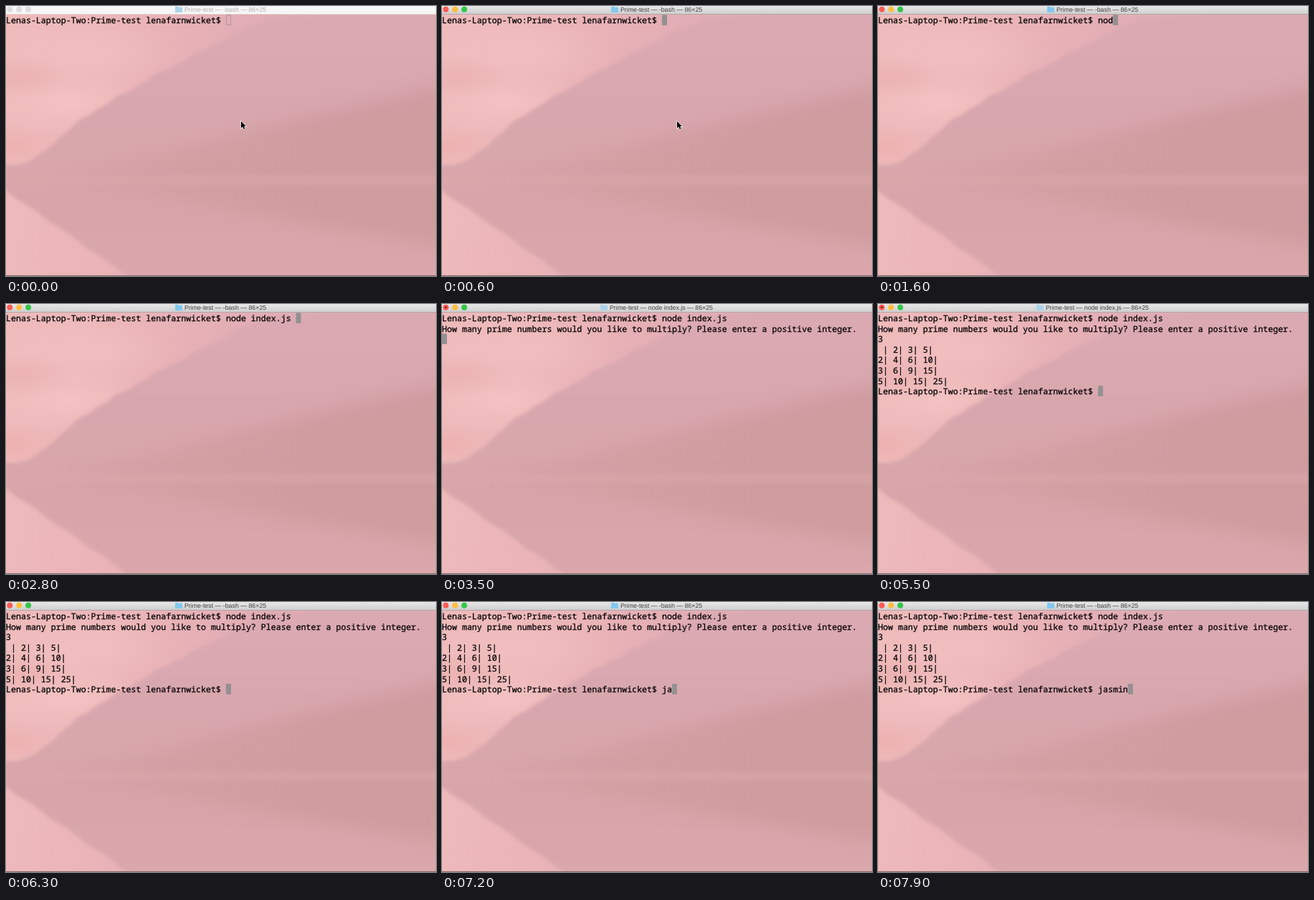
Write an HTML page with a canvas that moves like this. It is 600x377 px and loops after 8 s.

```html
<!DOCTYPE html>
<html lang="en">
<head>
<meta charset="utf-8">
<title>Terminal session</title>
<style>
  html, body { margin: 0; width: 100%; height: 100%; overflow: hidden; }
  canvas { display: block; width: 600px; height: 377px; }
</style>
</head>
<body>
<canvas id="stage" width="600" height="377"></canvas>
<script>
const W = 600, H = 377, LOOP = 8000;
const BAR = 11, CELL = W / 86, LINE = 14.57, TOP = 12.3;
const FOCUS = 500, HIDE_POINTER = 1200, RUN = 3400, EXIT = 5700;
const ctx = document.getElementById('stage').getContext('2d');
ctx.textRendering = 'geometricPrecision';

const PROMPT = 'Lenas-Laptop-Two:Prime-test lenafarnwicket$ ';
const QUESTION = 'How many prime numbers would you like to multiply? Please enter a positive integer.';

// Each entry sets one terminal row from the given time on.
const show = (at, row, text) => ({ at, row, text });

const type = (start, step, row, word, before = '') =>
  [...word].map((_, i) => show(start + i * step, row, PROMPT + before + word.slice(0, i + 1)));

function productTable(primes) {
  const cells = factor => primes.map(p => ` ${p * factor}|`).join('');
  return [' |' + cells(1), ...primes.map(p => `${p}|` + cells(p))];
}

const log = [
  show(0, 0, PROMPT),
  ...type(HIDE_POINTER, 200, 0, 'node '),
  ...type(2600, 100, 0, 'in', 'node '),
  show(2800, 0, PROMPT + 'node index.js '),
  show(3300, 1, ''),
  show(3500, 1, QUESTION),
  show(3500, 2, ''),
  show(4900, 2, '3'),
  show(5100, 3, ''),
  ...productTable([2, 3, 5]).map((text, i) => show(5200, 3 + i, text)),
  show(5200, 7, PROMPT),
  ...type(6900, 200, 7, 'jasmin')
];

function linear(c, x0, y0, x1, y1, ...colors) {
  const g = c.createLinearGradient(x0, y0, x1, y1);
  colors.forEach((color, i) => g.addColorStop(i / (colors.length - 1), color));
  return g;
}

function polygon(c, points, fill) {
  c.beginPath();
  points.forEach(([x, y]) => c.lineTo(x, y));
  c.closePath();
  c.fillStyle = fill;
  c.fill();
}

function cloud(c, x, y, size, color) {
  c.save();
  c.translate(x, y);
  c.scale(size, size * 0.4);
  c.fillStyle = c.createRadialGradient(0, 0, 0, 0, 0, 1);
  c.fillStyle.addColorStop(0, `rgba(${color},.75)`);
  c.fillStyle.addColorStop(1, `rgba(${color},0)`);
  c.fillRect(-1, -1, 2, 2);
  c.restore();
}

// Foot eases in from the shore, then the slope flattens towards the top.
function ridge(x) {
  const foot = 1 - Math.exp(-((x / 58) ** 2));
  const crags = Math.sin(x / 9) + Math.sin(x / 4.3) * 0.8;
  return 222 - x * (0.65 - x * 0.00025) * foot + crags * foot;
}

const shore = x => 258 + 0.7 * x + Math.sin(x / 8);

function paintBackdrop() {
  const canvas = document.createElement('canvas');
  canvas.width = W;
  canvas.height = H;
  const c = canvas.getContext('2d');
  c.fillStyle = linear(c, 0, 0, 330, 60, '#efbbbb', '#ebb5b8', '#e2adb4');
  c.fillRect(0, 0, W, H);
  cloud(c, 90, 135, 115, '245,198,196');
  cloud(c, 110, 65, 130, '243,193,193');
  cloud(c, 20, 100, 75, '234,176,175');
  cloud(c, 5, 195, 70, '236,174,172');

  const xs = Array.from({ length: 125 }, (_, i) => i * 3 - 6);
  const outline = [
    ...xs.map(x => [x, ridge(x)]), [W + 9, -9], [W + 9, H + 9],
    ...xs.reverse().map(x => [x, shore(x)])
  ];
  c.filter = 'blur(2px)';
  polygon(c, outline, linear(c, 0, 0, 0, H, '#dcaab3', '#d9a8b0', '#d8a7ac', '#d8a6aa', '#daa8ac'));

  // Shade fans out from the left end of the waterline, above and below it.
  c.filter = 'blur(12px)';
  const shade = linear(c, 60, 0, 420, 0, 'rgba(202,151,152,0)', 'rgba(202,151,152,.4)', 'rgba(202,151,152,.65)');
  for (const reach of [-135, 95]) {
    polygon(c, [[60, 243], [W + 20, 243], [W + 20, 243 + reach]], shade);
  }
  c.filter = 'blur(4px)';
  c.fillStyle = 'rgba(220,170,172,.55)';
  c.fillRect(-10, 238, W + 20, 10);
  c.filter = 'none';
  c.fillStyle = '#80666a';
  c.fillRect(0, H - 1, W, 1);
  return canvas;
}

function disc(x, y, r, fill) {
  ctx.beginPath();
  ctx.arc(x, y, r, 0, 7);
  ctx.fillStyle = fill;
  ctx.fill();
}

function drawTitleBar(active, running) {
  ctx.fillStyle = active ? linear(ctx, 0, 0, 0, BAR, '#e9e8e9', '#d0cfd0') : '#f6f6f6';
  ctx.fillRect(0, 0, W, BAR);
  ctx.fillStyle = active ? '#b3a6a8' : '#e4d3d5';
  ctx.fillRect(0, BAR, W, 1);

  ['#fc5b55', '#fdbd3c', '#34c648'].forEach((color, i) =>
    disc(5.3 + 12.9 * i, 4.7, 4, active ? color : '#dcdcdc'));
  if (running) disc(5.3, 4.7, 1.4, '#7d1512');

  const x = running ? 221 : 236;
  ctx.fillStyle = active && !running ? '#82c8ee' : '#acd3e8';
  ctx.fillRect(x, 0.8, 4.5, 2);
  ctx.fillRect(x, 1.7, 10, 7.3);

  ctx.font = '8.8px "Liberation Sans", sans-serif';
  ctx.fillStyle = active ? '#404040' : '#b0b0b0';
  ctx.fillText(`Prime-test — ${running ? 'node index.js' : '-bash'} — 86×25`, x + 13, 8);
}

function drawTerminal(t, active) {
  const rows = [];
  for (const { at, row, text } of log) if (t >= at) rows[row] = text;

  const last = rows.length - 1;
  const x = rows[last].length * CELL, y = TOP + last * LINE;
  if (active) {
    ctx.fillStyle = '#939091';
    ctx.fillRect(x, y, CELL, LINE);
  } else {
    ctx.strokeStyle = '#a58f92';
    ctx.lineWidth = 0.8;
    ctx.strokeRect(x + 0.5, y + 0.5, CELL - 0.8, LINE - 1);
  }

  ctx.font = `${CELL / 0.6}px "Noto Sans Mono", monospace`;
  ctx.fillStyle = ctx.strokeStyle = '#080506';
  ctx.lineWidth = 0.3;
  rows.forEach((text, row) => [...text].forEach((ch, col) => {
    const spot = [col * CELL, TOP + row * LINE + 11.8];
    ctx.fillText(ch, ...spot);
    ctx.strokeText(ch, ...spot);
  }));
}

function drawPointer(x, y) {
  const arrow = new Path2D(`M${x} ${y}v9.6l2.2-2 1.6 3.4 1.7-.8-1.5-3.2h2.8z`);
  ctx.lineWidth = 1.4;
  ctx.strokeStyle = '#f4eeee';
  ctx.stroke(arrow);
  ctx.fillStyle = '#000';
  ctx.fill(arrow);
}

const backdrop = paintBackdrop();

function frame(now) {
  const t = now % LOOP;
  const active = t >= FOCUS;
  ctx.drawImage(backdrop, 0, 0);
  drawTitleBar(active, t >= RUN && t < EXIT);
  drawTerminal(t, active);
  if (t < HIDE_POINTER) drawPointer(328, 161);
  requestAnimationFrame(frame);
}
requestAnimationFrame(frame);
</script>
</body>
</html>
```
